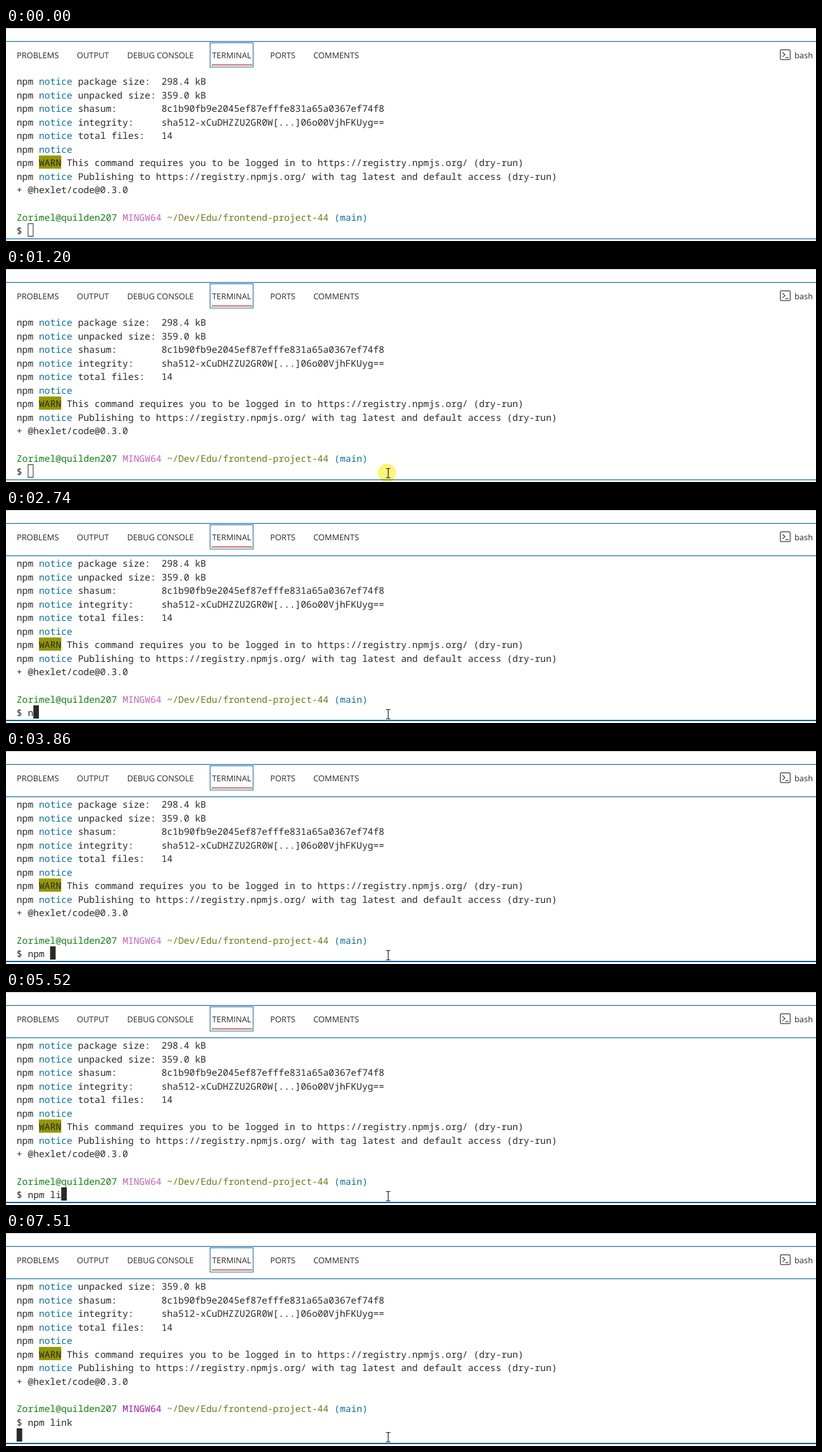
An HTML page for the animation above (8 s loop, 1280 by 338 pixels).

```html
<!DOCTYPE html>
<html lang="en">
<head>
<meta charset="utf-8">
<title>Terminal</title>
<style>
  html, body { margin: 0; width: 100%; height: 100%; overflow: hidden; background: #fff; }
  svg { display: block; width: 1280px; height: 338px; }
  text { white-space: pre; text-rendering: geometricPrecision; fill: #292929; }
  .tab { font: 12.85px "Open Sans", "Noto Sans", sans-serif; }
  .term { font: 14.68px "Noto Sans Mono", "DejaVu Sans Mono", monospace; }
  .cyan { fill: #0b7099; }
  .green { fill: #108010; }
  .pink { fill: #c563b5; }
  .olive { fill: #75751a; }
  .scrolled .pink { fill: #a818a8; }
  #halo { fill: #fdf577; mix-blend-mode: multiply; }
</style>
</head>
<body>
<svg id="stage" viewBox="0 0 1280 338">
  <rect width="1280" height="338" fill="#fff"/>
  <rect width="1280" height="1" fill="#cbcbcb"/>
  <rect y="20.8" width="1280" height="1.2" fill="#1468a0"/>
  <g id="tabs"></g>
  <rect x="322.5" y="23.5" width="68" height="38.5" fill="none" stroke="#1468a0"/>
  <rect x="325" y="58" width="64" height="1.2" fill="#b5200d"/>
  <g fill="none" stroke="#3b3b3b" stroke-width="1.2">
    <rect x="1223.6" y="34.6" width="15.6" height="15.6" rx="1.5"/>
    <path d="M1227 38.5l4 3.7-4 3.7M1231.5 46.8h5"/>
  </g>
  <g id="log"></g>
  <text id="input" class="term"></text>
  <rect id="caret"/>
  <rect id="topLine" y="72" width="1280" height="1.2" fill="#1870ae"/>
  <rect id="bottomLine" width="1280" fill="#0f5a92"/>
  <circle id="halo" r="14.5"/>
  <path id="pointer" fill="none" stroke="#222" stroke-width="1.2"
        d="M-3.5 -7.5h2.5l1 1 1 -1h2.5M0 -6.5v13M-3.5 7.5h2.5l1 -1 1 1h2.5"/>
</svg>
<script>
const LOOP = 8000, LEFT = 16.8, CELL = 8.808, TOP = 73, ROW = 21.55;
const ENTER = 330, ARRIVE = 1200, FOCUS = 1270, HALO_END = 1400, RUN = 7510;
const COMMAND = 'npm link';
const KEY_TIMES = [2740, 3130, 3530, 3860, 4990, 5520, 5910, 6390];

const $ = id => document.getElementById(id);
const set = (el, attrs) => {
  for (const key in attrs) el.setAttribute(key, attrs[key]);
  return el;
};
const add = (parent, tag, attrs, content = '') => {
  const el = document.createElementNS('http://www.w3.org/2000/svg', tag);
  el.textContent = content;
  parent.append(set(el, attrs));
};
const colX = col => LEFT + col * CELL;
const rowY = row => TOP + row * ROW;
const baseline = row => rowY(row) + 17;

const tabs = [[17, 'PROBLEMS'], [112, 'OUTPUT'], [191.5, 'DEBUG CONSOLE'],
  [325.7, 'TERMINAL'], [417.5, 'PORTS'], [485.7, 'COMMENTS'], [1246, 'bash']];
for (const [x, label] of tabs) add($('tabs'), 'text', { x, y: 48, class: 'tab' }, label);

const notice = rest => [['npm '], ['notice', 'cyan'], [rest]];
const lines = [
  notice(' package size:  298.4 kB'),
  notice(' unpacked size: 359.0 kB'),
  notice(' shasum:        8c1b90fb9e2045ef87efffe831a65a0367ef74f8'),
  notice(' integrity:     sha512-xCuDHZZU2GR0W[...]06o00VjhFKUyg=='),
  notice(' total files:   14'),
  notice(''),
  [['npm '], ['WARN', 'warn'], [' This command requires you to be logged in to https://registry.npmjs.org/ (dry-run)']],
  notice(' Publishing to https://registry.npmjs.org/ with tag latest and default access (dry-run)'),
  [['+ @hexlet/code@0.3.0']],
  [],
  [['Zorimel@quilden207', 'green'], [' '], ['MINGW64', 'pink'], [' '],
    ['~/Dev/Edu/frontend-project-44', 'olive'], [' '], ['(main)', 'cyan']],
];

function drawLog(scroll) {
  const log = $('log');
  log.replaceChildren();
  log.setAttribute('class', scroll ? 'scrolled' : '');
  lines.slice(scroll).forEach((parts, row) => {
    let col = 0;
    for (const [content, style = ''] of parts) {
      if (style === 'warn') {
        add(log, 'rect', { x: colX(col), y: rowY(row), width: 4 * CELL, height: 21, fill: '#949800' });
      }
      // Skip leading blanks so each run starts on its own column.
      const text = content.trimStart();
      const x = colX(col + content.length - text.length);
      if (text) add(log, 'text', { x, y: baseline(row), class: 'term ' + style }, text);
      col += content.length;
    }
  });
}

function pointerAt(t) {
  if (t >= ARRIVE) return [604, 324];
  const step = Math.min(9, Math.floor((t - ENTER) / 67.7));
  const ease = 1 - (1 - step / 9) ** 2;
  return [786 - 169 * ease, 347 - 16 * ease];
}

let shownScroll = -1;
function render(t) {
  const scroll = t >= RUN ? 1 : 0;
  if (scroll !== shownScroll) drawLog(shownScroll = scroll);

  const typed = KEY_TIMES.filter(time => time <= t).length;
  const input = $('input');
  set(input, { x: colX(0), y: baseline(11 - scroll) });
  input.textContent = '$ ' + COMMAND.slice(0, typed);

  const focused = t >= FOCUS;
  const caretX = colX(scroll ? 0 : 2 + typed);
  set($('caret'), focused
    ? { x: caretX, y: 310, width: CELL, height: 21, fill: '#292929', stroke: 'none' }
    : { x: caretX + .5, y: 310.5, width: 8, height: 20, fill: 'none', stroke: '#292929' });
  set($('topLine'), { opacity: focused ? 1 : 0 });
  set($('bottomLine'), focused ? { y: 333, height: 2 } : { y: 334, height: 1.1 });

  const [x, y] = pointerAt(t);
  set($('pointer'), { transform: `translate(${x} ${y})`, opacity: t >= ENTER ? 1 : 0 });
  set($('halo'), { cx: x - 2, cy: y - .5, opacity: t >= ENTER && t < HALO_END ? 1 : 0 });
}

const start = performance.now();
function tick() {
  render((performance.now() - start) % LOOP);
  requestAnimationFrame(tick);
}
tick();
</script>
</body>
</html>
```
